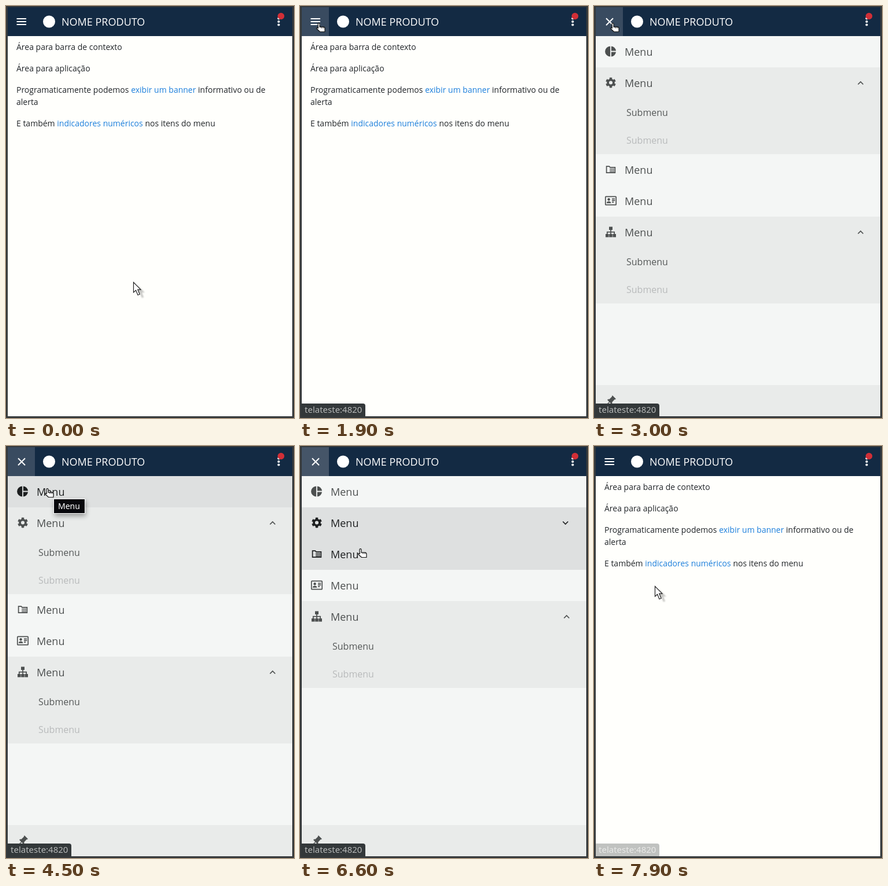
These frames come from a looping animation (498 by 712 pixels, 8000 ms). An HTML page:

```html
<!DOCTYPE html>
<html lang="pt">
<head>
<meta charset="utf-8">
<style>
  html, body { margin: 0; width: 100%; height: 100%; overflow: hidden; }
  svg { display: block; width: 498px; height: 712px; font-family: "Open Sans", sans-serif; }
  .page { font-size: 14px; fill: #212529; }
  .page tspan { fill: #1c7fdc; }
  .chrome { font-family: "Noto Sans", sans-serif; }
  .row { color: #4d5050; font-size: 18px; fill: currentColor; }
  .row.hover { color: #1d1f20; }
  .row rect.bg { fill: none; }
  .row.hover rect.bg { fill: #dee0e0; }
  .sub { font-size: 16px; fill: #565959; }
  .sub .off { fill: #b8babb; }
  .line { fill: none; stroke: currentColor; stroke-width: 1.7; }
</style>
</head>
<body>
<svg viewBox="0 0 498 712">
  <defs>
    <filter id="blur" x="-50%" y="-50%" width="200%" height="200%"><feGaussianBlur stdDeviation="1"/></filter>
    <filter id="soft" x="-50%" y="-50%" width="200%" height="200%"><feGaussianBlur stdDeviation="4"/></filter>
    <path id="arrowShape" d="M.5 .5V18L4.6 14.3 8 22.5 11.2 21.2 7.8 13.2H13Z"/>
    <g id="pie" transform="scale(.9) translate(-12 -12)">
      <path d="M11 2V22A10 10 0 0 1 11 2M13 2V11H22A10 10 0 0 0 13 2M13 13V22A10 10 0 0 0 22 13Z"/>
    </g>
    <g id="cog" class="line" transform="scale(.9)">
      <circle r="5.5" stroke-width="4.2"/>
      <circle r="8.3" stroke-width="3.2" pathLength="12" stroke-dasharray="1.1 .9" stroke-dashoffset="-.45"/>
    </g>
    <g id="folder" class="line">
      <path d="M-7.4 -5.4h4.6l1.8 1.8h8.4v9.2h-14.8Z"/>
      <path d="M-1.6 -.8h8M-1.6 1.5h8M-1.6 3.8h8" stroke-dasharray="2 .7"/>
    </g>
    <g id="card">
      <rect class="line" x="-9.2" y="-7.2" width="18.4" height="14.4" rx="1"/>
      <circle cx="-3.4" cy="-2.2" r="2.2"/>
      <path d="M-7.2 4.2c0 -4.4 7.6 -4.4 7.6 0Z"/>
      <path class="line" d="M2 -3.2h5.2M2 -.4h5.2M2 2.4h3.4"/>
    </g>
    <g id="tree">
      <path d="M-3 -9h6v5.5h-6ZM-9 3.5h5.6v5.5h-5.6ZM-2.8 3.5h5.6v5.5h-5.6ZM3.4 3.5h5.6v5.5h-5.6Z"/>
      <path class="line" d="M0 -4V4M-6.2 4V.2H6.2V4"/>
    </g>
  </defs>

  <rect width="498" height="712" fill="#fffffc"/>
  <g class="page">
    <text x="18" y="76">Área para barra de contexto</text>
    <text x="18" y="113">Área para aplicação</text>
    <text x="18" y="150">Programaticamente podemos <tspan>exibir um banner</tspan> informativo ou de</text>
    <text x="18" y="171">alerta</text>
    <text x="18" y="208">E também <tspan>indicadores numéricos</tspan> nos itens do menu</text>
  </g>

  <g id="menu">
    <rect x="3" y="52" width="492" height="657" fill="#f4f6f5"/>
    <rect x="3" y="655" width="492" height="54" fill="#e9ebea"/>
    <path transform="translate(29 682) rotate(45) scale(.84) translate(-12 -12)" fill="#4d5050"
      d="M16 12V4H17V2H7V4H8V12L6 14V16H11.2V22H12.8V16H18V14Z"/>
  </g>

  <rect x="3" y="2" width="492" height="50" fill="#132a43"/>
  <rect id="button" x="3" y="2" width="47" height="50"/>
  <g fill="none" stroke="#fff" stroke-width="2">
    <path id="bars" d="M18.5 22h16.5M18.5 27h16.5M18.5 32h16.5"/>
    <path id="cross" d="M21 21.2l12 12M33 21.2l-12 12"/>
  </g>
  <circle cx="74.5" cy="27" r="10.5" fill="#fff"/>
  <text x="96" y="34" font-size="18" fill="#fff">NOME PRODUTO</text>
  <g fill="#fff"><circle cx="471.5" cy="21.5" r="2.1"/><circle cx="471.5" cy="27" r="2.1"/><circle cx="471.5" cy="32.5" r="2.1"/></g>
  <circle cx="475.5" cy="17.5" r="5.8" fill="#d02f37"/>

  <g id="status" class="chrome">
    <path d="M3 687H109a4 4 0 0 1 4 4V709H3Z" fill="#33383a"/>
    <text x="8" y="703" font-size="15" fill="#b6b8b8">telateste:4820</text>
  </g>
  <path d="M0 0H498V712H0ZM3 2V709H495V2Z" fill="#35393b" fill-rule="evenodd"/>

  <g id="tip" class="chrome">
    <rect x="84" y="95" width="54" height="26" opacity=".35" filter="url(#soft)"/>
    <rect x="82.5" y="91.5" width="54" height="25" fill="#08080c" stroke="#fff"/>
    <text x="90" y="109" font-size="14" fill="#fff">Menu</text>
  </g>

  <g id="arrow">
    <use href="#arrowShape" x="7" y="5" opacity=".22" filter="url(#blur)"/>
    <use href="#arrowShape" fill="#fff" stroke="#222" stroke-width="1.2"/>
  </g>
  <g id="hand" fill="#fff" stroke="#111" stroke-width="1.2" stroke-linejoin="round">
    <path d="M3 2.2C3 .2 6 .2 6 2.2V7.2H12.5Q15 7.4 15 10V15.5H6.5L1 10.2C.2 8.6 2 8 3.4 9.4Z"/>
    <path d="M9 7.4v2.4M12 7.4v2.4" stroke-width=".9"/>
  </g>
</svg>
<script>
const $ = id => document.getElementById(id);
const menu = $("menu");
const ramp = (t, a, b) => Math.min(1, Math.max(0, (t - a) / (b - a)));
const smooth = p => p * p * (3 - 2 * p);
const show = (id, on) => $(id).setAttribute("opacity", +on);
const move = (el, x, y) => el.setAttribute("transform", `translate(${x} ${y})`);

function add(markup) {
  const g = document.createElementNS("http://www.w3.org/2000/svg", "g");
  g.innerHTML = markup;
  return menu.appendChild(g);
}

// Submenu block under an expandable row; y is relative to that row.
const addGroup = () => add(`<rect x="3" width="492" height="150" fill="#e9ebea"/>
  <g class="sub"><text x="56" y="84">Submenu</text><text x="56" y="132" class="off">Submenu</text></g>`);
const groups = [addGroup(), addGroup()];

const rows = ["pie", "cog", "folder", "card", "tree"].map((icon, i) => {
  const chevron = i % 3 == 1 ? '<path class="line chevron" d="M456.5 29.5l4.5 -4.5 4.5 4.5"/>' : "";
  const row = add(`<rect class="bg" x="3" width="492" height="54"/>
    <use href="#${icon}" x="0" transform="translate(29 26.5)"/>
    <text x="53" y="34">Menu</text>${chevron}`);
  row.setAttribute("class", "row");
  return row;
});

// Start and end time of each hovered row
const hovers = [[4100, 5200], [5200, 6700], [6600, 6700], [6700, 7800], [0, 0]];

// Pointer path: time, x, y
const path = [
  [0, 220, 477], [300, 153, 278], [800, 153, 278], [1000, 146, 256], [1100, 146, 256],
  [1700, 31, 32], [1800, 31, 32], [1900, 28, 29], [3800, 28, 29], [4300, 67, 73],
  [4900, 67, 73], [5400, 97, 127], [6200, 97, 127], [6400, 109, 140], [6500, 109, 140],
  [6600, 100, 177], [6700, 97, 250], [6800, 97, 250], [7100, 100, 242],
  [7600, 100, 242], [7700, 105, 242], [8000, 105, 242]
];

function pointer(t) {
  const i = path.findIndex(k => k[0] > t);
  const [a, b] = [path[i - 1], path[i]];
  const p = ramp(t, a[0], b[0]);
  return [a[1] + (b[1] - a[1]) * p, a[2] + (b[2] - a[2]) * p];
}

function draw(t) {
  const open = smooth(ramp(t, 2500, 3000)) * (1 - smooth(ramp(t, 7300, 7800)));
  move(menu, -495 * (1 - open), 0);

  const folded = t >= 5500;
  const lift = 96 * smooth(ramp(t, 5600, 5900));
  const tops = [52, 106, 256 - lift, 310 - lift, 364 - lift];
  rows.forEach((row, i) => {
    move(row, 0, tops[i]);
    const [from, to] = hovers[i];
    row.classList.toggle("hover", t >= from && t < to);
  });
  groups.forEach((g, i) => move(g, 0, tops[1 + 3 * i]));
  groups[0].setAttribute("opacity", +!folded);
  rows[1].querySelector(".chevron").setAttribute("transform", folded ? "rotate(180 460 27)" : "");

  const active = t >= 1600 && t < 7700;
  const crossed = t >= 2600 && t < 7500;
  $("button").setAttribute("fill", !active ? "none" : t < 5300 ? "#394b60" : "#455568");
  show("bars", !crossed);
  show("cross", crossed);
  show("tip", t >= 4500 && t < 5000);
  show("status", ramp(t, 1500, 1700) * (1 - .7 * ramp(t, 7800, 7900)));

  const [x, y] = pointer(t);
  for (const id of ["arrow", "hand"]) {
    move($(id), x, y);
    show(id, (id == "hand") == active);
  }
}

// The screen refreshes ten times a second.
function tick() {
  draw(Math.floor(performance.now() % 8000 / 100) * 100);
  requestAnimationFrame(tick);
}
tick();
</script>
</body>
</html>
```
